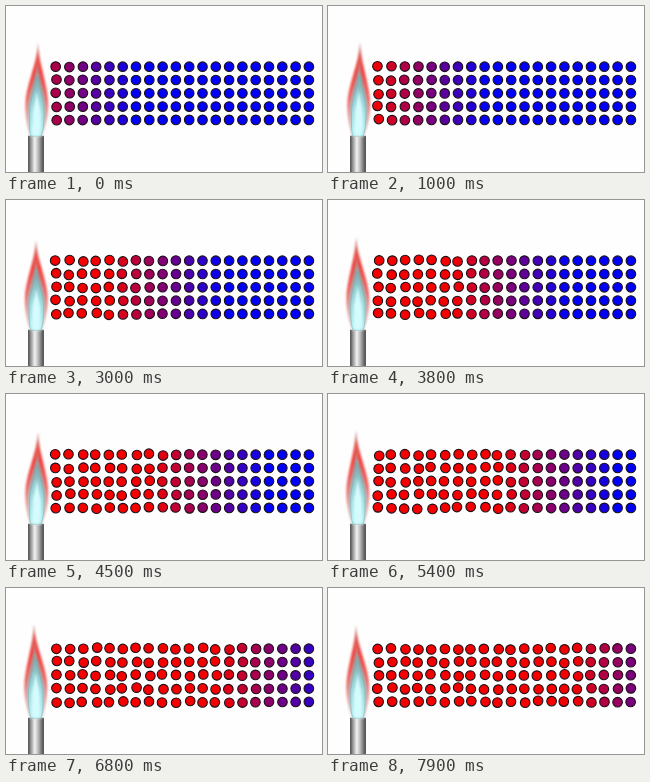
These frames come from a looping animation (316x166 px, 8 s). An HTML page:

```html
<!DOCTYPE html>
<html lang="en">
<head>
<meta charset="utf-8">
<title>Heat conduction</title>
<style>
  html, body { margin: 0; width: 100%; height: 100%; overflow: hidden; background: #fefefe; }
  svg { display: block; width: 100vw; height: 100vh; }
</style>
</head>
<body>
<svg viewBox="0 0 316 166">
  <defs>
    <linearGradient id="metal">
      <stop offset="0" stop-color="#4a4a4a"/>
      <stop offset=".14" stop-color="#8c8c8c"/>
      <stop offset=".42" stop-color="#f2f2f2"/>
      <stop offset=".65" stop-color="#b8b8b8"/>
      <stop offset="1" stop-color="#484848"/>
    </linearGradient>
    <linearGradient id="fire" x2="0" y2="1">
      <stop offset="0" stop-color="#b98480"/>
      <stop offset=".14" stop-color="#e0605a"/>
      <stop offset=".3" stop-color="#f5403c"/>
      <stop offset=".6" stop-color="#f4625e"/>
      <stop offset=".85" stop-color="#eeb4b0"/>
      <stop offset="1" stop-color="#ece0de"/>
    </linearGradient>
    <linearGradient id="haze" x2="0" y2="1">
      <stop offset="0" stop-color="#c98682"/>
      <stop offset=".25" stop-color="#a09a9a"/>
      <stop offset=".6" stop-color="#b4b4b4"/>
      <stop offset="1" stop-color="#d5dada"/>
    </linearGradient>
    <linearGradient id="glow" x2="0" y2="1">
      <stop offset="0" stop-color="#7f9c9f"/>
      <stop offset=".35" stop-color="#93ccd0"/>
      <stop offset="1" stop-color="#b4f2f5"/>
    </linearGradient>
    <filter id="soft" x="-20%" width="140%"><feGaussianBlur stdDeviation=".8"/></filter>
  </defs>
  <rect x="22.3" y="130" width="15.4" height="38" fill="url(#metal)" stroke="#444" stroke-width=".6"/>
  <g id="flame">
    <path fill="url(#fire)" filter="url(#soft)"/>
    <path fill="url(#haze)" filter="url(#soft)"/>
    <path fill="url(#glow)" stroke="#7fb0b5" stroke-width=".6"/>
    <path fill="#d4fbfd" filter="url(#soft)"/>
  </g>
  <g id="particles" stroke="#1c1018" stroke-width="1.1"></g>
</svg>
<script>
const LOOP = 8000, STEP = 100, COLS = 20, ROWS = 5;
const layers = document.querySelectorAll('#flame path');
const group = document.getElementById('particles');

// Flame tip poses: time, x, y
const sway = [
  [0, 32, 37], [500, 29, 38], [1000, 32, 36], [1500, 29, 38], [2000, 33, 36],
  [3000, 30, 40], [3700, 28, 37], [4500, 32, 38], [5400, 28, 36],
  [6100, 31, 37], [6800, 28, 36], [7300, 31, 38], [7900, 28, 37], [8000, 29, 37]
];

const dots = Array.from({ length: COLS * ROWS }, (_, n) => {
  const dot = document.createElementNS('http://www.w3.org/2000/svg', 'circle');
  dot.setAttribute('r', 4.8);
  group.append(dot);
  return { dot, col: n % COLS, row: Math.floor(n / COLS) };
});

const clamp = v => Math.max(0, Math.min(1, v));
const mix = (a, b, k) => a + (b - a) * k;

function noise(a, b) {
  const v = Math.sin(a * 127.1 + b * 311.7) * 43758.5453;
  return (v - Math.floor(v)) * 2 - 1;
}

function tipAt(t) {
  const i = sway.findIndex(p => p[0] > t);
  const [t0, x0, y0] = sway[i - 1], [t1, x1, y1] = sway[i];
  const u = (t - t0) / (t1 - t0), k = u * u * (3 - 2 * u);
  return [mix(x0, x1, k), mix(y0, y1, k)];
}

function flamePath(cx, tx, ty, half, belly, foot) {
  const h = belly - ty;
  const l = cx - half, r = cx + half;
  return `M${tx} ${ty}C${tx + 1} ${ty + h * .35} ${r} ${belly - h * .3} ${r} ${belly}` +
    `C${r} ${belly + 14} ${30 + foot + 2} 124 ${30 + foot} 130L${30 - foot} 130` +
    `C${30 - foot - 2} 124 ${l} ${belly + 14} ${l} ${belly}` +
    `C${l} ${belly - h * .3} ${tx - 1} ${ty + h * .35} ${tx} ${ty}Z`;
}

function drawFlame(t) {
  const [x, y] = tipAt(t), lean = x - 30;
  const cx = 30.3 + lean * .25;
  const shapes = [
    [cx, x, y, 11.5, 99, 6],
    [cx, 30 + lean * .7, y + 18, 9.2, 102, 5.5],
    [cx, 30.3 + lean * .5, y + 30, 7.2, 106, 5],
    [cx, 30.3 + lean * .3, y + 48, 4.2, 110, 3]
  ];
  shapes.forEach((s, i) => layers[i].setAttribute('d', flamePath(...s)));
}

function drawParticles(t) {
  const tick = Math.round(t / STEP);
  const front = 1.7 + t * .00219;
  dots.forEach(({ dot, col, row }, n) => {
    const heat = clamp(.5 + (front - col) / 8.5);
    const shake = 1.1 * heat * heat;
    dot.setAttribute('cx', 50.2 + col * 13.3 + shake * noise(n, tick));
    dot.setAttribute('cy', 60.7 + row * 13.3 + shake * noise(n + 200, tick));
    dot.setAttribute('fill', `rgb(${Math.round(244 * heat)},0,${Math.round(248 * (1 - heat))})`);
  });
}

const start = performance.now();
function render(now) {
  const t = Math.floor(Math.max(0, now - start) % LOOP / STEP) * STEP;
  drawFlame(t);
  drawParticles(t);
  requestAnimationFrame(render);
}
render(start);
</script>
</body>
</html>
```
